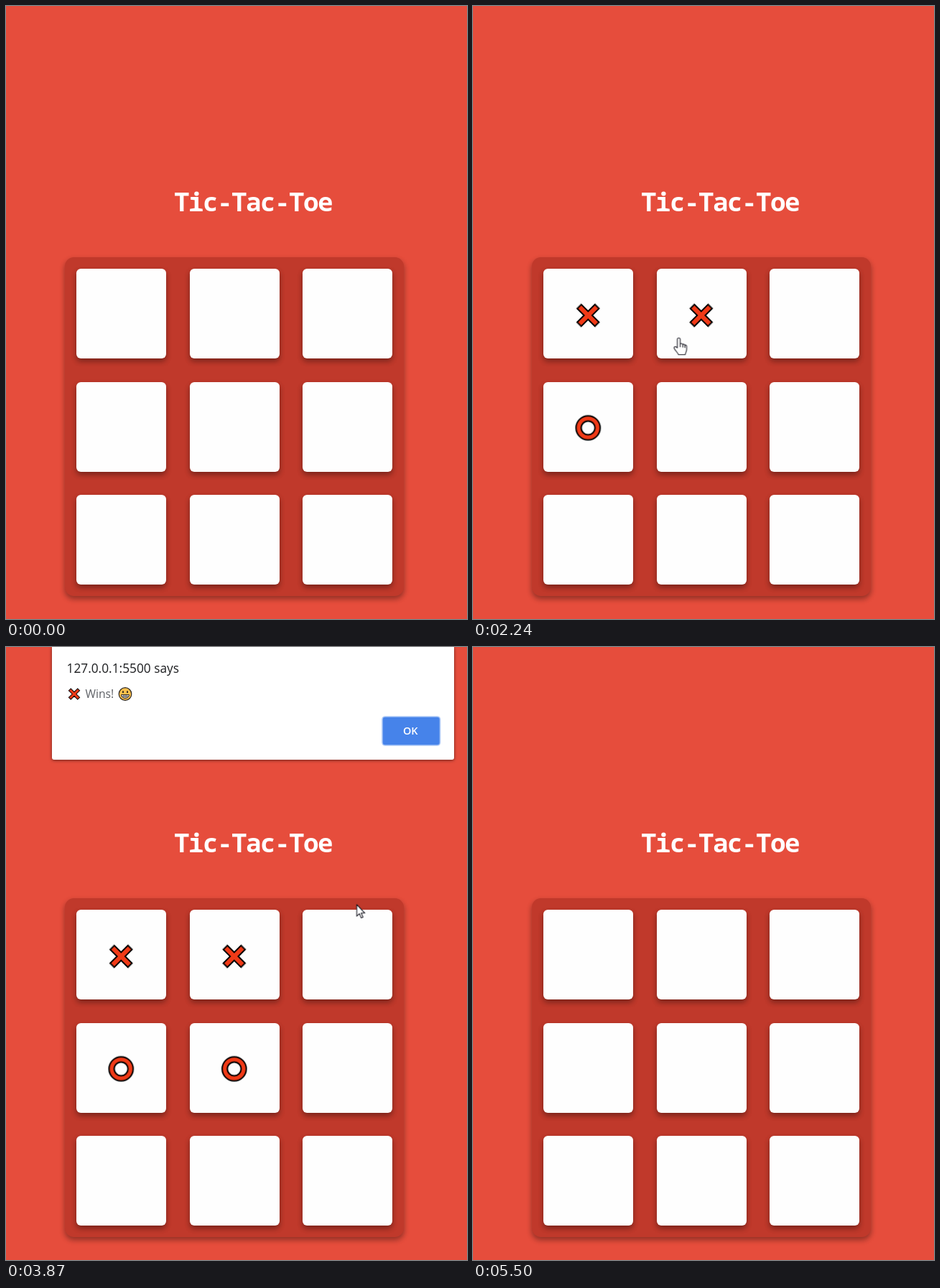
Write an HTML page that moves like this. It is 642 px wide and 854 px high and loops after 6.43 s.

```html
<!DOCTYPE html>
<html lang="en">
<head>
<meta charset="utf-8">
<title>Tic-Tac-Toe</title>
<style>
html, body { margin: 0; width: 100%; height: 100%; overflow: hidden; background: #e64d3c; }
#stage { position: absolute; left: 0; top: 0; width: 642px; height: 854px; overflow: hidden; --loop: 6430ms; }
svg { position: absolute; left: 0; top: 0; overflow: visible; }

.board {
  position: absolute; left: 82px; top: 350px; width: 472px; height: 472px; box-sizing: border-box;
  padding: 16px; display: grid; grid-template: repeat(3, 125px) / repeat(3, 125px); gap: 32.5px;
  background: #c0392b; border-radius: 12.5px;
}
.board i { background: #fefefe; border-radius: 6.25px; }
.board, .board i { box-shadow: 0 4px 7px rgba(0, 0, 0, .22), 0 4px 8px rgba(0, 0, 0, .18); }
.title { font: bold 36px "Noto Sans Mono", "DejaVu Sans Mono", monospace; letter-spacing: -1.6px; fill: #fff; }

/* Marks */
.mark { opacity: 0; animation: var(--loop) step-end infinite; }
.x1 { animation-name: x1; }
.o1 { animation-name: o1; }
.x2 { animation-name: x2; }
.o2 { animation-name: o2; }
.x3 { animation-name: x3; }
@keyframes x1 { 13.53% { opacity: 1 } 79.5% { opacity: 0 } }
@keyframes o1 { 21.15% { opacity: 1 } 79.5% { opacity: 0 } }
@keyframes x2 { 34.06% { opacity: 1 } 79.5% { opacity: 0 } }
@keyframes o2 { 41.99% { opacity: 1 } 79.5% { opacity: 0 } }
@keyframes x3 { 77.6% { opacity: 1 } 79.5% { opacity: 0 } }

/* Alert box */
.alert {
  position: absolute; left: 64px; top: 0; width: 560px; height: 156.5px;
  background: #fff; border-radius: 0 0 3px 3px; box-shadow: 0 1px 4px rgba(0, 0, 0, .55);
  transform-origin: 280px 58px; opacity: 0; animation: alert var(--loop) linear infinite;
}
.alert text { font-family: "Open Sans", "Noto Sans", sans-serif; }
@keyframes alert {
  0%, 52.88% { opacity: 0; transform: translateY(-23px) perspective(1000px) rotateX(7.6deg); }
  53.65% { opacity: .7; transform: translateY(-11.7px) perspective(1000px) rotateX(3.6deg); }
  54.28% { opacity: 1; transform: translateY(-3px) perspective(1000px) rotateX(1deg); }
  55.05%, 77.6% { opacity: 1; transform: translateY(0) perspective(1000px) rotateX(0deg); }
  78.54% { opacity: .3; transform: translateY(-19px) perspective(1000px) rotateX(6.3deg); }
  79.16%, 100% { opacity: 0; transform: translateY(-23px) perspective(1000px) rotateX(7.6deg); }
}

/* Pointer: --h is 1 over a cell, 0 elsewhere */
.pointer { --h: 0; animation: path var(--loop) linear infinite, kind var(--loop) step-end infinite; }
.hand { opacity: var(--h); }
.arrow { opacity: calc(1 - var(--h)); }
@keyframes path {
  0%, 4.03% { transform: translate(700px, 900px); }
  4.04% { transform: translate(493px, 838px); }
  8.71% { transform: translate(265px, 571px); }
  10.89% { transform: translate(188px, 484px); }
  13.06%, 15.23% { transform: translate(166px, 457px); }
  15.24% { transform: translate(205.5px, 585px); animation-timing-function: ease-out; }
  17.42% { transform: translate(215px, 630px); animation-timing-function: ease-out; }
  20.2%, 24.42% { transform: translate(213px, 645px); }
  27.99% { transform: translate(250px, 560px); }
  31.88% { transform: translate(285px, 475px); }
  33.6%, 34.84% { transform: translate(286.5px, 462px); }
  37.33% { transform: translate(289px, 505px); }
  39.81% { transform: translate(294px, 551px); }
  41.06%, 44.48% { transform: translate(296px, 557px); }
  47.43% { transform: translate(380px, 470px); }
  50.54% { transform: translate(460px, 392px); }
  52.26%, 59.88% { transform: translate(483px, 372.5px); }
  61.59% { transform: translate(512px, 300px); }
  63.14% { transform: translate(546px, 200px); }
  64.7% { transform: translate(562px, 140px); }
  66.25% { transform: translate(590px, 112px); }
  68.43% { transform: translate(560px, 122px); }
  69.83%, 83.36% { transform: translate(552.5px, 125.5px); }
  84.29% { transform: translate(600px, 440px); }
  85.07% { transform: translate(622px, 700px); }
  85.53% { transform: translate(632px, 852px); }
  85.54%, 100% { transform: translate(700px, 900px); }
}
@keyframes kind {
  0%, 5.68%, 6.78%, 8.96%, 25.4%, 29.6%, 36.5%, 45.6%, 47.43%, 59.88%, 100% { --h: 0; }
  4.6%, 6.35%, 7.36%, 10.7%, 28.6%, 31.2%, 38.35%, 46.72%, 48.7% { --h: 1; }
}
</style>
</head>
<body>
<div id="stage">
  <div class="board"><i></i><i></i><i></i><i></i><i></i><i></i><i></i><i></i><i></i></div>

  <svg width="642" height="854">
    <defs>
      <path id="cross" transform="rotate(45)" fill="#f03a17" stroke="#000" stroke-width="2"
        d="M-4-17.4H4V-4H17.4V4H4V17.4H-4V4H-17.4V-4H-4Z"/>
      <g id="ring" fill="none">
        <circle r="13.2" stroke="#f03a17" stroke-width="7.5"/>
        <circle r="16.8" stroke="#000" stroke-width="2"/>
        <circle r="9.6" stroke="#000" stroke-width="2"/>
      </g>
    </defs>
    <text class="title" x="234" y="285.5">Tic-Tac-Toe</text>
    <use class="mark x1" href="#cross" x="160.3" y="431"/>
    <use class="mark x2" href="#cross" x="317.8" y="431"/>
    <use class="mark x3" href="#cross" x="475.3" y="431"/>
    <use class="mark o1" href="#ring" x="160.3" y="587.7"/>
    <use class="mark o2" href="#ring" x="317.8" y="587.7"/>
  </svg>

  <div class="alert">
    <svg width="560" height="156">
      <text x="20.5" y="36" font-size="17.3" fill="#1d1e20">127.0.0.1:5500 says</text>
      <use href="#cross" transform="translate(31 65.5) scale(.5)"/>
      <text x="46.5" y="71" font-size="15.7" fill="#5c5f64">Wins!</text>
      <g transform="translate(102 65.5)" stroke="#2b2620">
        <circle r="8.8" fill="#fdc04c" stroke-width="1.2"/>
        <path d="M-5.5 1H5.5C5.5 7.5-5.5 7.5-5.5 1Z" fill="#fff"/>
        <path d="M-2.2 1V5.4M0 1V5.8M2.2 1V5.4M-5 3.2H5" stroke-width=".7"/>
        <path d="M-3-4.2V-1.6M3-4.2V-1.6" stroke-width="1.8"/>
      </g>
      <rect x="460" y="97" width="80.5" height="40" rx="4" fill="#4683ea" stroke="#a9c6f6" stroke-width="1.6"/>
      <text x="499.3" y="122" font-size="14.5" font-weight="600" fill="#fff" text-anchor="middle">OK</text>
    </svg>
  </div>

  <svg width="642" height="854">
    <g class="pointer" fill="#fff" stroke="#15151f" stroke-width="1.1" stroke-linejoin="round">
      <path class="arrow" d="M0 0V16.2L3.7 12.7 6.2 18.6 8.7 17.5 6.2 11.8H11.3Z"/>
      <path class="hand" d="M-2 14V2.2C-2-.4 2-.4 2 2.2V9C2.4 7.4 5.5 7.7 5.6 9.6 5.9 8.4 8.4 8.8 8.5 10.8 9 9.6 11 10 11 11.8V16C11 19 9.4 20.5 9 23.5H-.5C-1 21-5 18-6.5 14.5-7 12.6-4.6 11.6-3.4 13ZM2 9V13M5.6 9.6V13.5M8.5 10.8V14"/>
    </g>
  </svg>
</div>
</body>
</html>
```
